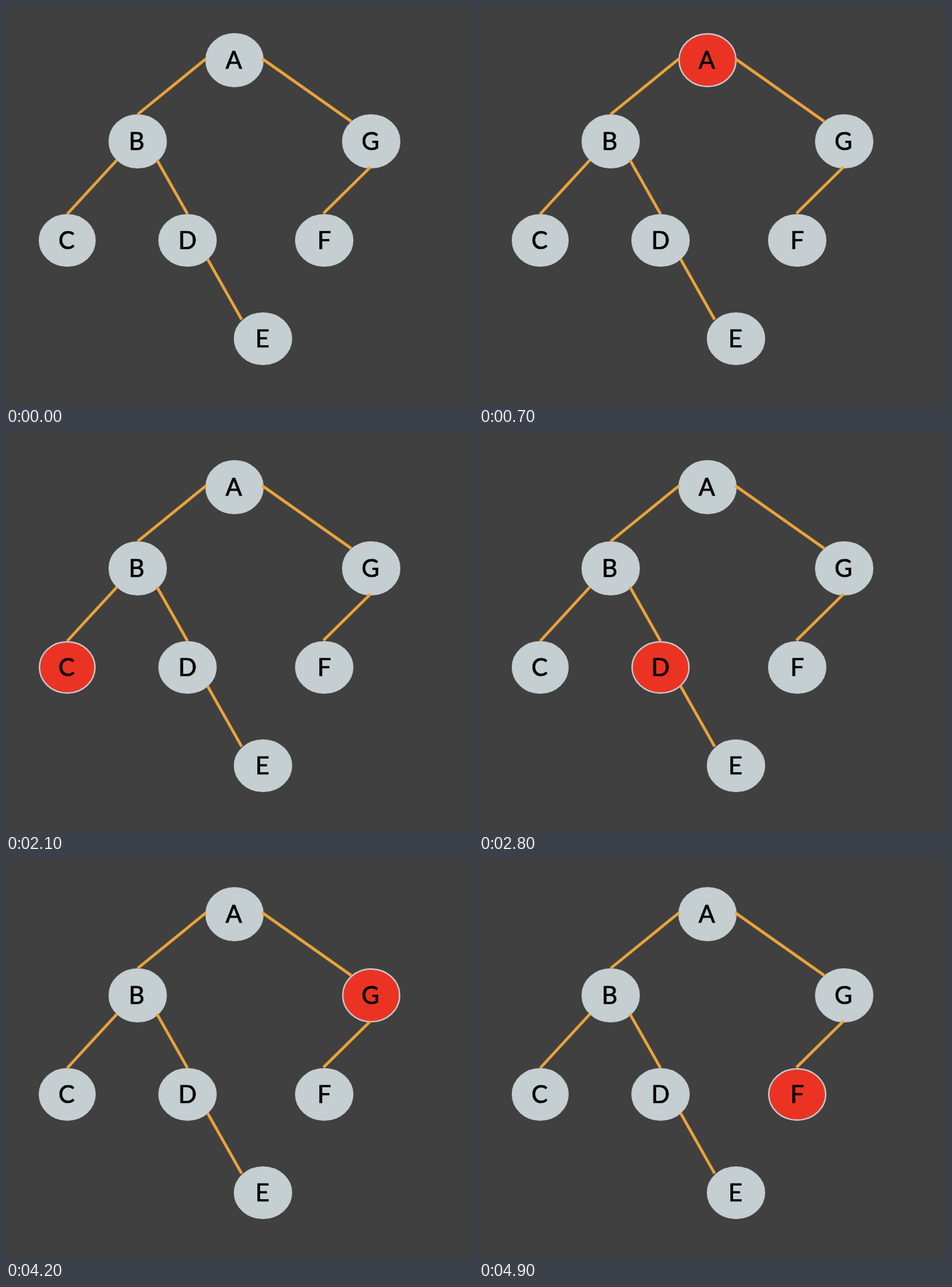
An HTML page that plays this animation: 656 px wide and 560 px high, repeating every 5600 ms.

```html
<!DOCTYPE html>
<html lang="en">
<head>
<meta charset="utf-8">
<title>Tree traversal</title>
<style>
  html, body { margin: 0; width: 100%; height: 100%; overflow: hidden; background: #404040; }
  svg { display: block; width: 656px; height: 560px; }
  ellipse { fill: #c5ced1; stroke: #c5ced1; stroke-width: 2; }
  ellipse.active { fill: #eb3323; }
  path { fill: none; stroke: #e9a33b; stroke-width: 4; }
  text { font: 34px Lato, sans-serif; text-anchor: middle; stroke: #000; stroke-width: .7; }
</style>
</head>
<body>
<svg viewBox="0 0 656 560">
  <g id="nodes"></g>
  <path d="M281 74L185 152M360 74L485 162M156 216L86 292M212 216L255 292M283 355L331 440M512 226L446 291"/>
  <g id="labels"></g>
</svg>
<script>
const STEP = 700;

// Visit order: name, centre x, centre y, rx, ry, label x
const nodes = [
  ['A', 321, 76, 41, 38, 320],
  ['B', 185, 190, 41, 38, 183.5],
  ['C', 86, 329, 40, 37, 85],
  ['D', 255, 329, 41, 37, 255],
  ['E', 361, 467, 41, 37, 360],
  ['G', 513, 190, 41, 38, 512],
  ['F', 447, 329, 41, 37, 447],
];

function add(parent, tag, attrs) {
  const el = document.createElementNS('http://www.w3.org/2000/svg', tag);
  for (const key in attrs) el.setAttribute(key, attrs[key]);
  return document.getElementById(parent).appendChild(el);
}

const ellipses = nodes.map(([name, cx, cy, rx, ry, x]) => {
  add('labels', 'text', { x, y: cy + 12 }).textContent = name;
  return add('nodes', 'ellipse', { cx, cy, rx: rx - 1, ry: ry - 1 });
});

const start = performance.now();

// The first step of each loop shows the tree with nothing visited.
function draw() {
  const elapsed = performance.now() - start;
  const step = Math.floor(elapsed / STEP) % (nodes.length + 1);
  ellipses.forEach((el, i) => el.classList.toggle('active', i === step - 1));
  requestAnimationFrame(draw);
}
draw();
</script>
</body>
</html>
```
